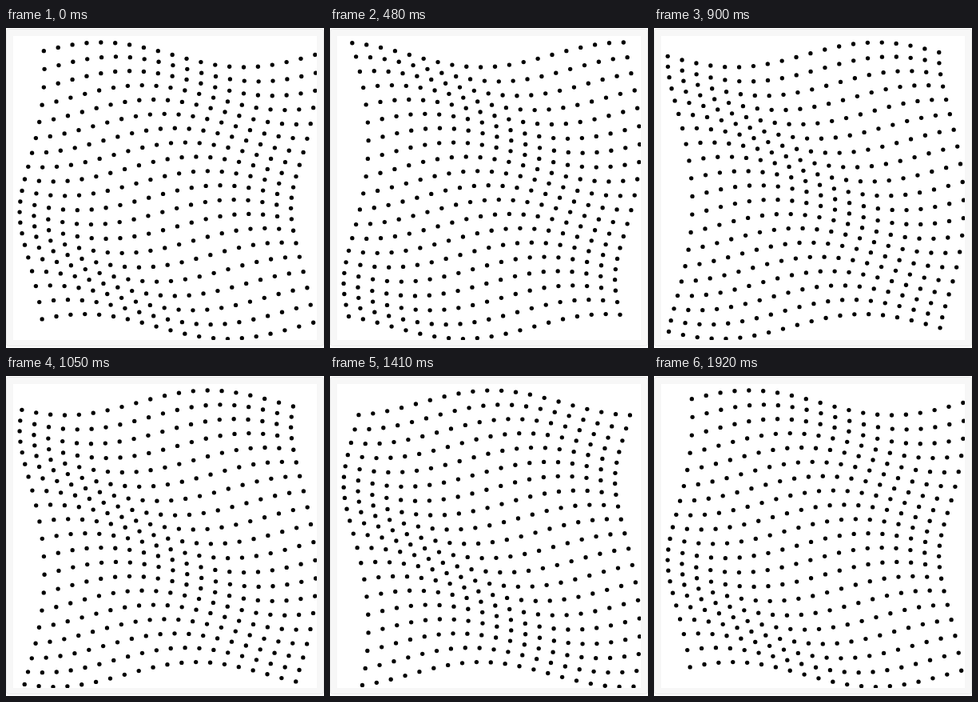
Recreate the animation shown at these times as an HTML page with a canvas. Size 398 by 400 pixels, loop 1.95 s.

```html
<!DOCTYPE html>
<html lang="en">
<head>
<meta charset="utf-8">
<title>Dot wave</title>
<style>
html, body { margin: 0; width: 100%; height: 100%; overflow: hidden; background: #fff; }
canvas { display: block; }
</style>
</head>
<body>
<canvas id="stage" width="398" height="400"></canvas>
<script>
const ctx = document.getElementById('stage').getContext('2d');
const COUNT = 20, GAP = 17.87, AMP = 15.5, RADIUS = 2.65;
const STEP = 30, STEPS = 65;
const start = performance.now();

// cosine of an angle given in turns
const wave = turns => Math.cos(2 * Math.PI * turns);

function drawPanel() {
  ctx.fillStyle = '#fff';
  ctx.fillRect(0, 0, 398, 400);
  ctx.beginPath();
  ctx.roundRect(0.5, 1.5, 397, 396, 3);
  ctx.fillStyle = '#f7f7f7';
  ctx.fill();
  ctx.strokeStyle = '#ebebeb';
  ctx.stroke();
  ctx.fillStyle = '#fff';
  ctx.fillRect(9, 10, 380, 380);
}

function drawDots(phase) {
  ctx.save();
  ctx.beginPath();
  ctx.rect(9, 10, 380, 380);
  ctx.clip();
  ctx.fillStyle = '#000';
  for (let row = 0; row < COUNT; row++) {
    const shift = AMP * wave((row - 1) / COUNT - phase);
    for (let col = 0; col < COUNT; col++) {
      const lift = AMP * wave((col - row - 4) / COUNT + phase);
      ctx.beginPath();
      ctx.arc(32.6 + GAP * col + shift, 33.5 + GAP * row - lift, RADIUS, 0, 2 * Math.PI);
      ctx.fill();
    }
  }
  ctx.restore();
}

function draw() {
  const elapsed = performance.now() - start;
  // the last step repeats the first pose
  const phase = Math.floor(elapsed / STEP) % STEPS / (STEPS - 1);
  drawPanel();
  drawDots(phase);
  requestAnimationFrame(draw);
}
draw();
</script>
</body>
</html>
```
